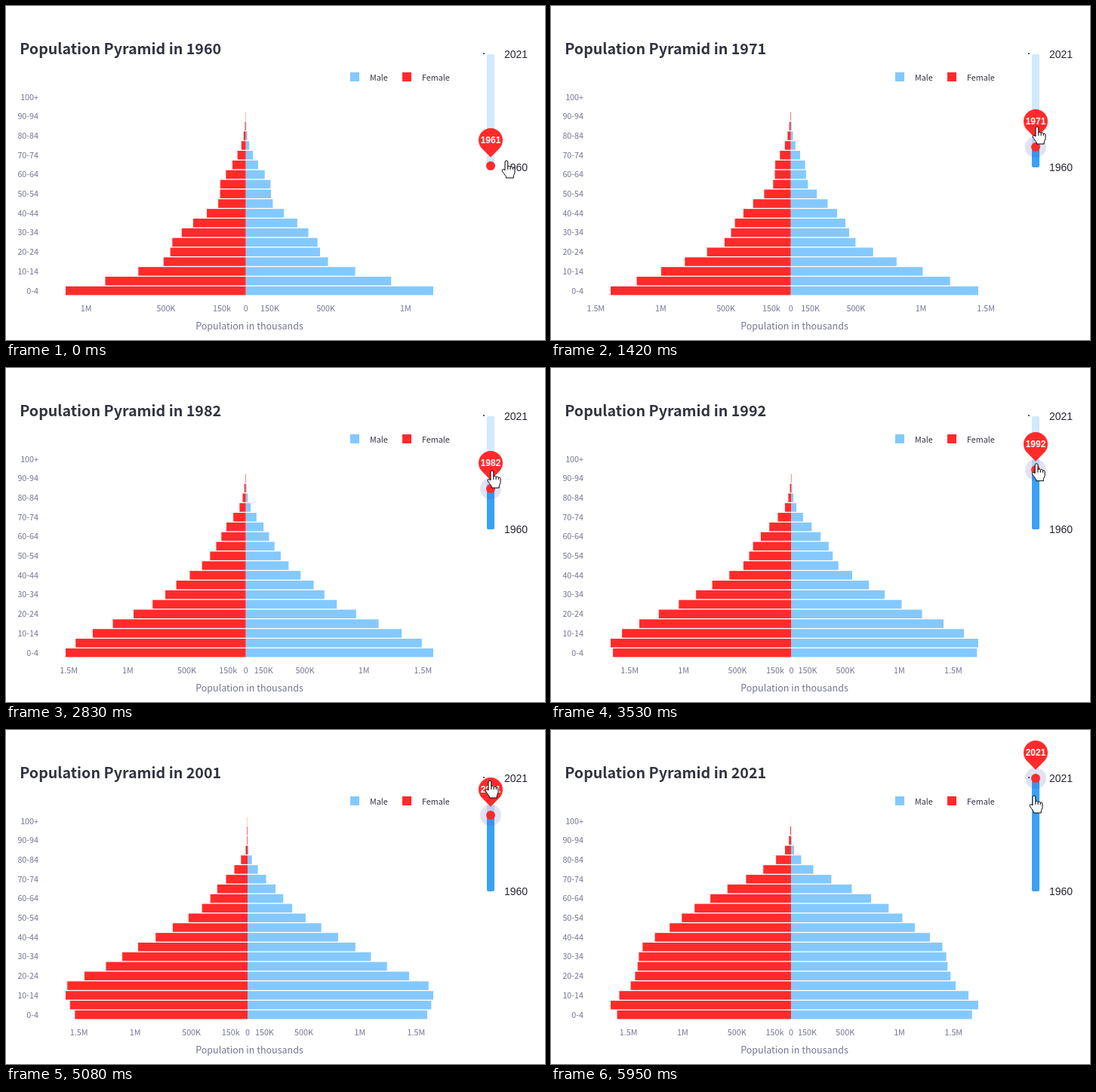
An HTML page for the animation above (5990 ms loop, 714 px wide and 443 px high).

```html
<!DOCTYPE html>
<html lang="en">
<head>
<meta charset="utf-8">
<title>Population Pyramid</title>
<style>
html, body { margin: 0; width: 714px; height: 443px; overflow: hidden; background: #fff; }
svg { display: block; }
.chart { font: 10.75px "Noto Sans CJK JP", "Noto Sans CJK SC", "Noto Sans", sans-serif; fill: #737592; }
.chart .title { font-size: 19.7px; font-weight: 700; }
.chart .axis { font-size: 12.53px; }
.dark { fill: #31333f; }
.slider { font: 14px "Liberation Sans", Arial, sans-serif; fill: #262730; }
.slider .value { font-size: 12px; font-weight: 700; fill: #fff; }
.mid { text-anchor: middle; }
.end { text-anchor: end; }
</style>
</head>
<body>
<svg width="714" height="443" viewBox="0 0 714 443">
  <g class="chart" id="chart"></g>
  <g class="slider" id="slider"></g>
  <g id="hand" fill="#fff" stroke="#000" stroke-linejoin="round">
    <path d="M-2 13V2a1.9 1.9 0 0 1 3.8 0V8.5c0-1.6 3.3-1.6 3.3.4c.3-1.4 3.2-1.2 3.2.7c.6-1 2.7-.6 2.7 1.3V15.5c0 2-1.8 3.5-1.8 5.5V23H-.5V21.5C-2 19-5 15.5-5.7 13.8c-.9-2 1.6-3.2 3.7-.8Z"/>
    <path d="M1.8 8.5V12M5.1 9V12M8.3 9.6V12" fill="none"/>
  </g>
</svg>
<script>
const LOOP = 5990, GROUPS = 21, PITCH = 12.845, RED = '#ff2b2b', BLUE = '#83c9ff';
const $ = id => document.getElementById(id);

// Key points of the women's curve, in ten thousands, at every second age group from -1 up
const keys = {
  1960: [133, 88, 51.5, 46, 33, 17.3, 16, 8.4, 2.8, .6],
  1971: [154, 118.5, 81.5, 51, 43, 29, 13.6, 12, 4.6, 1.2],
  1992: [160, 167.6, 141, 104.4, 73.4, 44.5, 35.6, 20.5, 6, 1.4],
  2001: [149.5, 158, 160.4, 126, 97.4, 66.6, 40.6, 27, 11.8, 1.7, .5],
  2021: [152.3, 166.5, 148, 141.6, 137, 112, 89, 58.7, 25.6, 5.6, .7]
};

// Catmull-Rom curve through the key points
function curve(points, group) {
  const pos = (group + 1) / 2, i = Math.floor(pos), u = pos - i;
  const [a, b, c, d] = [i - 1, i, i + 1, i + 2].map(n => points[Math.max(n, 0)] || 0);
  return Math.max(0, b + u / 2 * (c - a + u * (2 * a - 5 * b + 4 * c - d + u * (3 * (b - c) + d - a))));
}

// Years between two keyed ones are blended
function women(year, group) {
  const years = Object.keys(keys).map(Number);
  const from = years.filter(y => y <= year).pop(), to = years.find(y => y >= year);
  const a = curve(keys[from], group), b = curve(keys[to], group);
  return from === to ? a : a + (b - a) * (year - from) / (to - from);
}

// More boys than girls, fewer men from the twenties on and far fewer in old age
function menPerWoman(year, group) {
  const u = Math.min(group / 5, 1), tilt = .065 - .045 * ((year - 1960) / 61) ** 4;
  return Math.max(0, 1.04 - tilt * u * u * (3 - 2 * u) - .001 * Math.max(0, group - 9) ** 3);
}

// Timelines: [ms, year]
const charts = [[0, 1960], [345, 1961], [1160, 1971], [2700, 1982], [3400, 1992], [4735, 2001], [5710, 2021]];
const clicks = [[0, 1961], [690, 1971], [1550, 1982], [3050, 1992], [3990, 2001], [5280, 2021]];
// Hand moves: [start ms, end ms, x, y]
const moves = [
  [0, 0, 663, 205], [70, 620, 642, 187], [880, 1090, 644, 160], [1890, 2240, 644, 136],
  [3430, 3680, 642, 113], [4340, 5080, 641, 67], [5640, 5950, 640, 87]
];
const last = (steps, t) => steps.filter(s => s[0] <= t).pop();

const text = (x, y, s, cls = '') => `<text x="${x}" y="${y}" class="${cls}">${s}</text>`;
const rect = (x, y, w, h, fill, rx = 0) =>
  `<rect x="${x}" y="${y}" width="${w}" height="${h}" fill="${fill}" rx="${rx}"/>`;
const circle = (y, r, fill) => `<circle cx="642" cy="${y}" r="${r}" fill="${fill}"/>`;

function drawChart(year) {
  const f = Array.from({ length: GROUPS }, (_, i) => women(year, i));
  const m = f.map((v, i) => v * menPerWoman(year, i));
  const maxF = Math.max(...f), scale = 487 / (maxF + Math.max(...m));
  const zero = 79 + maxF * scale;
  let s = text(18.2, 64, 'Population Pyramid in ' + year, 'title dark')
    + rect(456, 88, 12, 12, BLUE) + text(482, 99, 'Male', 'dark')
    + rect(525, 88, 12, 12, RED) + text(551, 99, 'Female', 'dark')
    + text(322.5, 429, 'Population in thousands', 'axis mid');
  f.forEach((v, i) => {
    const y = 371.9 - PITCH * i, left = v * scale;
    s += rect(zero - left, y, left, 11.5, RED) + rect(zero, y, m[i] * scale, 11.5, BLUE);
    if (i % 2 === 0)
      s += text(43, Math.floor(382 - PITCH * i), i < 20 ? `${i * 5}-${i * 5 + 4}` : '100+', 'end');
  });
  for (const v of [-150, -100, -50, -15, 0, 15, 50, 100, 150]) {
    const x = zero + v * scale, n = Math.abs(v);
    const label = n >= 100 ? n / 100 + 'M' : n ? n * 10 + (v === -15 ? 'k' : 'K') : '0';
    if (x > 50 && x < 590) s += text(x, 405, label, 'mid');
  }
  $('chart').innerHTML = s;
}

function drawSlider(t) {
  const [start, year] = last(clicks, t);
  const y = Math.round(214 - (year - 1960) * 150 / 61);
  const age = t - start;
  const swell = start && age < 210 ? 4 * Math.sin(Math.PI * age / 210) : 0;
  $('slider').innerHTML = rect(637, 64, 10, 150, '#d0eaff', 2) + rect(637, y, 10, 214 - y, '#38a1f9', 2)
    + rect(632, 62, 2, 2, '#4a5578') + text(660, 69, 2021) + text(660, 219, 1960)
    + (t < 260 ? '' : circle(y, 14 + swell, 'rgba(63,81,181,.16)')) + circle(y, 6, RED)
    + `<path transform="translate(642 ${y - 34}) rotate(45)" fill="${RED}" d="M16 16H0A16 16 0 1 1 16 0Z"/>`
    + text(642, y - 30, year, 'value mid');
}

function drawHand(t) {
  let x = 0, y = 0;
  for (const [start, end, toX, toY] of moves) {
    const k = t >= end ? 1 : Math.max(0, (t - start) / (end - start));
    x += (toX - x) * k;
    y += (toY - y) * k;
  }
  $('hand').setAttribute('transform', `translate(${x} ${y})`);
}

let shown;
const begin = performance.now();
function frame() {
  const t = (performance.now() - begin) % LOOP;
  const year = last(charts, t)[1];
  if (year !== shown) drawChart(shown = year);
  drawSlider(t);
  drawHand(t);
  requestAnimationFrame(frame);
}
frame();
</script>
</body>
</html>
```
